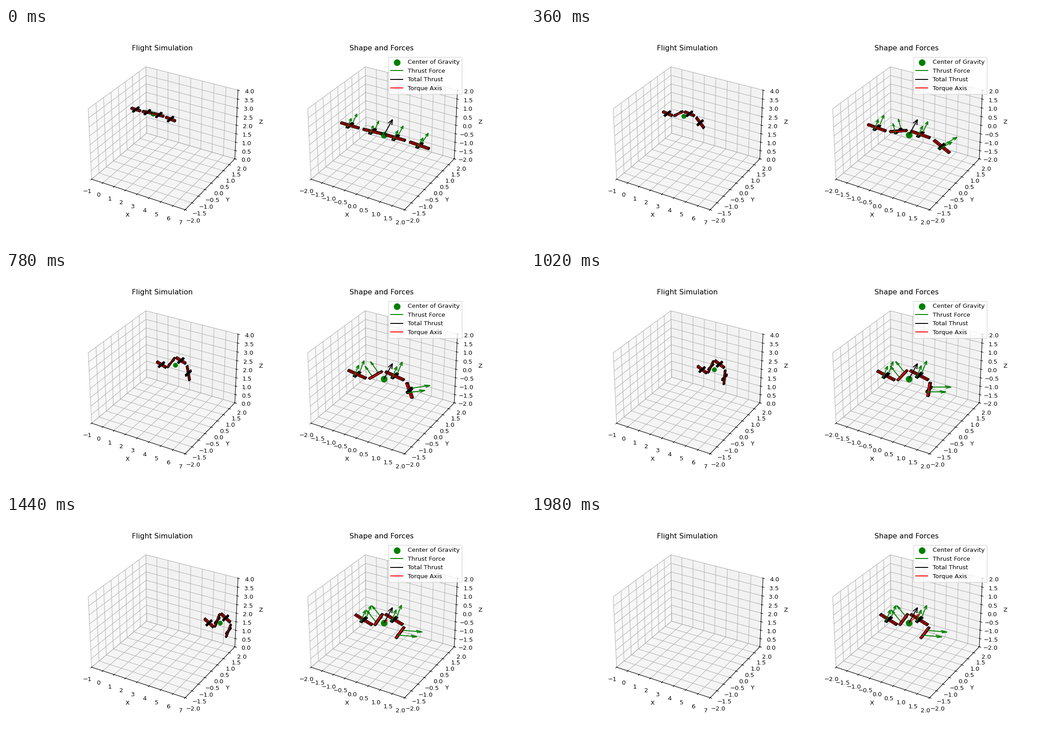
A matplotlib script that plays this animation: 1159 by 483 pixels, repeating every 2040 ms.

```python
import numpy as np
import matplotlib.pyplot as plt
from matplotlib.animation import FuncAnimation
from matplotlib.lines import Line2D
from mpl_toolkits.mplot3d.art3d import Poly3DCollection

FRAMES, STEP_MS = 34, 60
BAR = (0.8, 0.08, 0.08)
ROTOR = (0.1, 0.4, 0.05)
ARM = 0.2
TURN = np.array([0, 1, 0, -1])  # sense in which each link folds
FOLDED = 20                     # step at which the joints reach 90 degrees

fig = plt.figure(figsize=(12, 5), dpi=96.601)
flight = fig.add_subplot(121, projection="3d")
forces = fig.add_subplot(122, projection="3d")


def setup(ax, title, xlim, zlim):
    ax.set_title(title)
    ax.set_xlim(*xlim)
    ax.set_ylim(-2, 2)
    ax.set_zlim(*zlim)
    ax.set_xlabel("X")
    ax.set_ylabel("Y")
    ax.set_zlabel("Z")


setup(flight, "Flight Simulation", (-1, 7), (0, 4))
setup(forces, "Shape and Forces", (-2, 2), (-2, 2))

marker = forces.scatter([0], [0], [0], color="green", s=100, depthshade=False)
lines = [Line2D([], [], color=c, lw=1.5) for c in ("green", "black", "red")]
forces.legend([marker] + lines,
              ["Center of Gravity", "Thrust Force", "Total Thrust", "Torque Axis"],
              loc="upper right")

moving = []


def bend_at(n):
    """Joint angle in degrees: steady folding, then held."""
    return min(4.35 * (n + 1), 90)


def link_pose(n):
    """Link centres relative to the centre of gravity, and link angles."""
    bend = bend_at(n)
    settle = 1 - np.exp(-max(0, n - FOLDED) / 4)
    pitch = -bend * (0.135 + 0.00115 * bend) - 3 * settle
    angles = np.radians(pitch + bend * TURN)
    along = np.column_stack([np.cos(angles), np.zeros(4), np.sin(angles)])
    centers = np.cumsum(along, axis=0) - along / 2
    return centers - centers.mean(axis=0), angles


def thrusts(n):
    """Rotor thrust per link: folded links push sideways, the others lift."""
    bend = np.radians(bend_at(n))
    swing, fold = np.sin(bend), 1 - np.cos(bend)
    tx = 0.2 - 0.62 * TURN * swing
    folding = 0.585 - 0.065 * TURN - 0.21 * fold * (1 - TURN)
    tz = np.where(TURN == 0, 0.6 + 0.15 * swing, folding)
    return np.column_stack([tx, np.zeros(4), tz])


def torque_at(n):
    """A growing wobble once the shape is folded; only its positive part shows."""
    grow = 0.8 * max(0, n - FOLDED) / (FRAMES - 1 - FOLDED)
    return max(0, grow * np.cos(2 * np.pi * (n - FRAMES + 1) / 9))


def cg_position(n):
    m = n + 1
    return np.array([2 + 0.01085 * m**2 - 0.000076 * m**3,
                     0,
                     3.01 - 0.003 * m - 0.0001 * m**2])


def add_box(ax, center, angle, size, color):
    c, s = np.cos(angle), np.sin(angle)
    axes = np.array([[c, 0, s], [0, 1, 0], [-s, 0, c]]) * np.array(size)[:, None] / 2
    faces = []
    for k in range(3):
        u, v, w = axes[k], axes[(k + 1) % 3], axes[(k + 2) % 3]
        for side in (-1, 1):
            mid = center + side * u
            faces.append([mid + v + w, mid - v + w, mid - v - w, mid + v - w])
    box = Poly3DCollection(faces, facecolors=color, edgecolors="black", linewidths=1)
    ax.add_collection3d(box)
    moving.append(box)


def add_body(ax, centers, angles, origin):
    for center, angle in zip(centers, angles):
        add_box(ax, origin + center, angle, BAR, "red")
        add_box(ax, origin + center, angle, ROTOR, "black")


def add_arrow(start, vec, color):
    moving.append(forces.quiver(*start, *vec, color=color, arrow_length_ratio=0.3))


def update(n):
    while moving:
        moving.pop().remove()
    centers, angles = link_pose(n)
    cg = cg_position(n)

    add_body(flight, centers, angles, cg)
    moving.append(flight.scatter(*[[v] for v in cg], color="green", s=50,
                                 depthshade=False))

    add_body(forces, centers, angles, np.zeros(3))
    for center, push in zip(centers, thrusts(n)):
        for y in (-ARM, ARM):
            add_arrow(center + np.array([0, y, 0]), push, "green")

    add_arrow((0, 0, 0), (0.36, 0, 1), "black")
    torque = torque_at(n)
    if torque > 0.01:
        add_arrow((0, 0, 0), (0, torque, 0), "red")
    return moving


def reset():
    return update(0)


anim = FuncAnimation(fig, update, frames=FRAMES, init_func=reset,
                     interval=STEP_MS, repeat=True, repeat_delay=0, blit=False)
plt.show()
```
